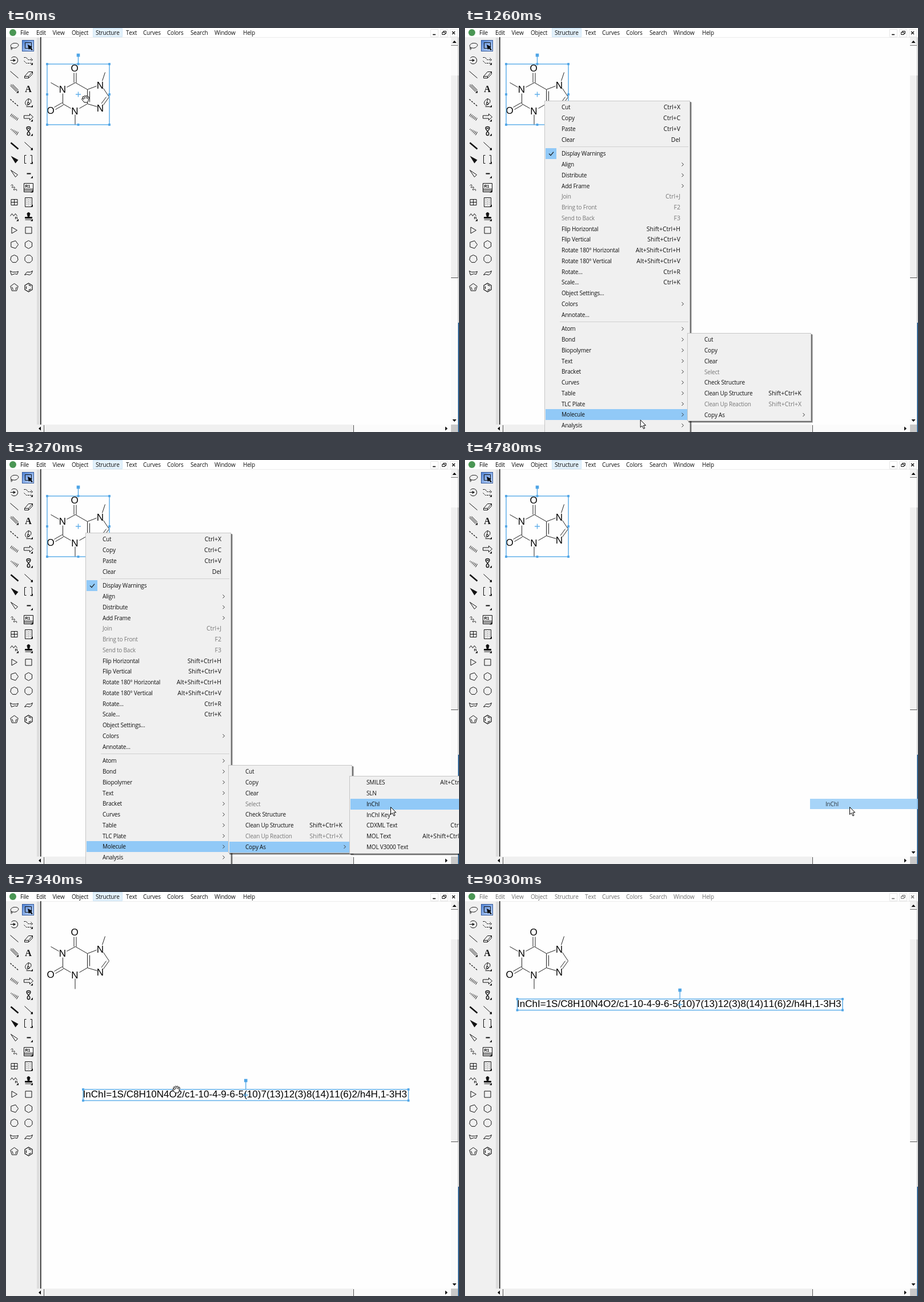
Recreate the animation shown at these times as an HTML page with a canvas. Size 793 by 706 pixels, loop 9.08 s.

```html
<!DOCTYPE html>
<html>
<head>
<meta charset="utf-8">
<style>
html, body { margin: 0; width: 100%; height: 100%; overflow: hidden; background: #fefefe; }
canvas { display: block; }
</style>
</head>
<body>
<canvas id="stage" width="793" height="706"></canvas>
<script>
const g = document.getElementById('stage').getContext('2d');
const LOOP = 9080, ROW = 18.75, HOVER = '#91c9f7', BLUE = '#62b0ea';
const UI = '"Open Sans", "Noto Sans", sans-serif', ARIAL = '"Liberation Sans", Arial, sans-serif';
const INCHI = 'InChI=1S/C8H10N4O2/c1-10-4-9-6-5(10)7(13)12(3)8(14)11(6)2/h4H,1-3H3';
g.fontKerning = 'none';

const clamp = v => Math.max(0, Math.min(1, v));
const ease = v => (v = clamp(v), v * v * (3 - 2 * v));
const box = (x, y, w, h, c) => { g.fillStyle = c; g.fillRect(x, y, w, h); };

function text(s, x, y, font, color = '#111', align = 'left', gap = 0) {
  g.font = font; g.fillStyle = color; g.textAlign = align;
  g.letterSpacing = gap + 'px';
  g.fillText(s, x, y);
}
const label = (s, x, y, color) => text(s, x, y, '10px ' + UI, color, 'left', -0.2);

// Draws an SVG path at x, y; fill and stroke may each be empty.
function path(x, y, d, stroke = '#111', fill, width = 1, dash = []) {
  const p = new Path2D(d);
  g.save();
  g.translate(x, y);
  g.lineWidth = width;
  g.setLineDash(dash);
  if (fill) { g.fillStyle = fill; g.fill(p); }
  if (stroke) { g.strokeStyle = stroke; g.stroke(p); }
  g.restore();
}

function poly(n, r, turn = 0) {
  const pts = Array.from({ length: n }, (_, i) => {
    const a = (i + turn) / n * 2 * Math.PI - Math.PI / 2;
    return (r * Math.cos(a)).toFixed(2) + ' ' + (r * Math.sin(a)).toFixed(2);
  });
  return 'M' + pts.join('L') + 'Z';
}

// Short slanted strokes along a falling diagonal; half-length grows from a to b.
function hashes(a, b) {
  return Array.from({ length: 6 }, (_, i) => {
    const h = a + (b - a) * i / 5, x = -5.5 + 2.2 * i, y = -3.5 + 1.5 * i;
    return `M${x - h * .6} ${y + h}L${x + h * .6} ${y - h}`;
  }).join('');
}

// Each tool: path, then optional stroke, fill, width and dash.
const K = '#111';
const TOOLS = [
  [['M-4 3C-9 0-5-5 1-5S9-2 6 1 0 4-4 3C-7 2-7 5-4 4-3 5-5 7-6 6'], ['M-6-6H5V4H-6Z']],
  [['M-5-4A6.3 6.3 0 1 1-5 4M-7 0H1M-1.500-2 2 0-1.500 2ZM-1 0H1.500'],
    ['M-8-5H-4L-1-1H7M4-4 7-1 4 2M-8 1-4 5H6', K, '', 1, [3, 1]]],
  [['M-7-6 7 6'], ['M-7 3 0-5H7L0 3ZM-7 3V6H0L7-1V-5M0 3V6']],
  [['M-7-5 4 6M-6-7 6 5M-3-7 7 3'], ['']],
  [['M-7-6 7 6', K, '', 1.2, [3, 2]], ['M-3 5C-8 2-6-4 0-7L4-5C6 0 2 3-3 5M0-7-1 0M-4 7H4M-2 0H1V3H-2Z']],
  [[hashes(2.2, 2.2)], ['M-8-2.5H2V-5.5L8 0 2 5.5V2.5H-8Z']],
  [[hashes(.8, 2.8)], ['M0 0C-5-5-4-8 0-8S5-5 0 0C-3 3-3 7 0 7S3 3 0 0M-2-5H2', K, '', 1.4]],
  [['M-6-5 7 6', K, '', 2.6], ['M-7-6 6 6M4 6H6V4']],
  [['M-6-6 7 1 2 7Z', '', K], ['M-4-7H-7V7H-4M3-7H6V7H3']],
  [['M-6-6 6 2 2 6Z'], ['M-3 0H4', K, '', 2]],
  [['M-6-4C-4-7-1-5-3-3S-4 0-2-1 2-2 0 1-1 4 1 3 5 2 4 5'], ['M-8-8H8V7H-8ZM-8 2H8M-8 4.5H8']],
  [['M-5.500-5H5.500V5H-5.500ZM0-5V5M-5.500 0H5.500'], ['M-6-8H6V8H-6Z']],
  [['M-7-1-4-5-1-1 2-5 5-1'], ['M-2-3A2.500 2.500 0 1 1 2-3L1 1H6V3H-6V1H-1ZM-6 5.500H6', K, K]],
  [['M-4.500-5.500 5 0-4.500 5.500Z'], ['M-5.500-5.500H5.500V5.500H-5.500Z']],
  [[poly(5, 7, .25)], [poly(6, 7)]],
  [[poly(7, 6.8)], [poly(8, 7, .5)]],
  [['M-7-4-3-2 3-2 7-3 5 2 1 1-5 3Z'], ['M7-4 3-2-3-2-7 3-3 2 2 3 5 1Z']],
  [[poly(5, 7) + 'M-4-1-2 4M4-1 2 4'], [poly(6, 7.5) + 'M-4-2V2.5M0-5 4-2.5M0 5 4 2.5', K, '', 1.2]]
];
const POPOUT = [[3, 12], [1, 4, 5, 6, 7, 8, 9, 10, 11, 12]];

function toolbar() {
  box(0, 16, 54, 690, '#f0f0f0');
  box(54, 16, 7, 690, '#dedede');
  const fade = g.createLinearGradient(29, 21, 48, 41);
  fade.addColorStop(0, '#4c7fd0');
  fade.addColorStop(1, '#c5dcff');
  box(28, 21, 21, 20, '#33599b');
  box(29, 22, 19, 18, fade);
  TOOLS.forEach((pair, i) => pair.forEach((tool, j) => {
    const x = 14 + 25 * j, y = Math.round(31 + 24.8 * i) + .5;
    path(x + .5, y, ...tool);
    if (POPOUT[j].includes(i)) path(x + 8, y + 8, 'M0-4V0H-4Z', '', K);
  }));
  path(39, 31, 'M-1-2 7 2 4 3 8 7 6 8 3 5 1 7Z', '', '#000');
  text('A', 39, 112, 'bold 16px "Liberation Serif", serif', K, 'center');
  text('R1', 38, 279, 'bold 7px ' + ARIAL, K, 'center');
  text('n', 18, 334, 'bold 8px ' + ARIAL, K, 'center');
  path(39.5, 303.5, 'M-3-5V5M0-4V6M3-5V5', '#333', '', 1, [1, 2]);
}

const MENUBAR = { File: 25, Edit: 53, View: 81.5, Object: 115, Structure: 157, Text: 210,
  Curves: 240, Colors: 282, Search: 323, Window: 365, Help: 415 };

function frameWindow(active) {
  const ink = active ? '#111' : '#707070';
  box(0, 0, 793, 706, '#fefefe');
  toolbar();
  box(0, 0, 793, 16, '#fff');
  box(54, 16, 738, 1, '#ececec');
  path(12, 8, 'M6 0A6 6 0 1 1-6 0 6 6 0 1 1 6 0', '', '#4a9654');
  if (active) path(0, 0, 'M152.5.5H203.5V15.5H152.5Z', '#cfe6f7', '#e3f1fb');
  for (const name in MENUBAR) label(name, MENUBAR[name], 12, ink);
  for (const x of [743.5, 760.5, 777.5]) path(x, 2.5, 'M0 0H13V13H0Z', '#e6e6e6');
  path(749, 11.5, 'M-2 0H3', ink, '', 1.6);
  path(766.5, 8.5, 'M-3-1H2V3H-3ZM-1-1V-3H4V1H2', ink);
  path(783.5, 8.5, 'M-2.5-2.5 2.5 2.5M2.5-2.5-2.5 2.5', ink, '', 1.3);

  box(60, 16, 1.6, 677, '#222');
  // scroll bars
  box(779, 17, 13, 676, '#fbfbfb');
  box(779, 17, 13, 14, '#f0f0f0');
  box(779, 83, 13, 354, '#f0f0f0');
  box(779, 436, 12, 1, '#555');
  box(779, 30, 12, 1, '#777');
  box(54, 693, 725, 13, '#fbfbfb');
  box(54, 693, 13, 13, '#f0f0f0');
  box(67, 693, 541, 13, '#f0f0f0');
  box(66, 694, 1, 12, '#555');
  box(608, 694, 1, 12, '#555');
  box(779, 693, 13, 13, '#c9c9c9');
  path(785, 24, 'M-3.5 2H3.5L0-2Z', '', '#000');
  path(785, 686, 'M-3.5-2H3.5L0 2Z', '', '#000');
  path(59, 700, 'M2-3.5V3.5L-2 0Z', '', '#000');
  path(771, 700, 'M-2-3.5V3.5L2 0Z', '', '#000');
  box(791, 16, 1, 690, '#c4c4c4');
  box(791, 83, 1, 354, '#888');
  box(792, 17, 1, 498, '#e8e8e8');
  box(791.5, 515, 1.5, 191, '#12538f');
}

function molecule() {
  path(.5, .5, 'M121 95 106 103M99 114V132L113 140M128 140 142 132V107L121 95M142 107 158 101' +
    'M170 105 180 120 170 134M159 137 142 132M146 110V129M166.500 131.500 175 120' +
    'M118.500 95V78M122.500 95V78M98 130 84 138M100 134 86 142' +
    'M92 103 78 95M120.500 151V169M168 92 173 77', '#222');
  const atoms = [['O', 120, 70], ['N', 99, 107], ['O', 78, 144], ['N', 120.5, 144.5], ['N', 165, 99.5], ['N', 165, 139.5]];
  for (const [s, x, y] of atoms) text(s, x, y + 6, '17px ' + ARIAL, '#000', 'center');
}

function selection(x, y, w, h, sides) {
  const cx = x + w / 2, cy = y + h / 2, dot = (px, py, r) => box(px - r, py - r, 2 * r, 2 * r, '#4fa5e6');
  path(x, y, `M0 0H${w}V${h}H0Z`, BLUE, '', 1.5);
  path(cx, y, 'M0 0V-15', BLUE, '', 1.5);
  path(cx, cy, 'M-4.500 0H4.500M0-4.500V4.500', BLUE, '', 1.4);
  dot(cx, y - 15.5, 2.8);
  for (const px of [x, x + w]) for (const py of [y, y + h]) dot(px, py, 1.9);
  if (sides) { dot(cx, y, 1.9); dot(cx, y + h, 1.9); dot(x, cy, 1.9); dot(x + w, cy, 1.9); }
}

// Item marks: "-" rule, "~" disabled, "*" checked; after "|" a shortcut, or ">" for a submenu.
const MAIN = ['Cut|Ctrl+X', 'Copy|Ctrl+C', 'Paste|Ctrl+V', 'Clear|Del', '-', '*Display Warnings', 'Align|>',
  'Distribute|>', 'Add Frame|>', '~Join|Ctrl+J', '~Bring to Front|F2', '~Send to Back|F3',
  'Flip Horizontal|Shift+Ctrl+H', 'Flip Vertical|Shift+Ctrl+V', 'Rotate 180° Horizontal|Alt+Shift+Ctrl+H',
  'Rotate 180° Vertical|Alt+Shift+Ctrl+V', 'Rotate...|Ctrl+R', 'Scale...|Ctrl+K', 'Object Settings...',
  'Colors|>', 'Annotate...', '-', 'Atom|>', 'Bond|>', 'Biopolymer|>', 'Text|>', 'Bracket|>', 'Curves|>',
  'Table|>', 'TLC Plate|>', 'Molecule|>', 'Analysis|>'];
const SUB = ['Cut', 'Copy', 'Clear', '~Select', 'Check Structure', 'Clean Up Structure|Shift+Ctrl+K',
  '~Clean Up Reaction|Shift+Ctrl+X', 'Copy As|>'];
const FORMATS = ['SMILES|Alt+Ctrl+C', 'SLN', 'InChI', 'InChI Key', 'CDXML Text|Ctrl+D',
  'MOL Text|Alt+Shift+Ctrl+M', 'MOL V3000 Text'];

function menu(x, y, w, h, items, hover, alpha) {
  if (alpha <= 0) return;
  g.globalAlpha = clamp(alpha);
  box(x + 3, y + 3, w, h, 'rgba(0,0,0,.2)');
  box(x + 2, y + 2, w, h, 'rgba(0,0,0,.45)');
  box(x, y, w, h, '#c6c6c6');
  box(x + 1, y + 1, w - 2, h - 2, '#f0f0f0');
  let cy = y + 11.7;
  for (const item of items) {
    if (item === '-') {
      box(x + 27, Math.round(cy - 6.5), w - 30, 1, '#d0d0d0');
      cy += 6;
      continue;
    }
    const [name, key] = item.replace(/^[~*]/, '').split('|');
    const ink = item[0] === '~' ? '#777' : '#111', top = Math.round(cy - ROW / 2);
    if (Math.abs(hover - cy) <= ROW / 2) box(x + 2, top, w - 5, 19, HOVER);
    if (item[0] === '*') {
      box(x + 2, top, 19, 19, HOVER);
      path(x + 12, cy, 'M-4 0-1 3 4-3', '#111', '', 1.2);
    }
    label(name, x + 30, cy + 3.6, ink);
    if (key === '>') path(x + w - 13, cy, 'M-1.500-3 1.500 0-1.500 3', '#333');
    else if (key) text(key, x + w - 17, cy + 3.6, '10.5px ' + UI, ink, 'right');
    cy += ROW;
  }
  g.globalAlpha = 1;
}

// Pointer stops: time, x, y.
const STOPS = [[0, 139, 124], [90, 139, 127], [280, 139, 127], [650, 260, 599], [890, 252, 684], [1140, 252, 684],
  [1430, 397, 685], [1670, 397, 685], [1980, 502, 670], [2150, 640, 664], [2340, 640, 664], [2570, 673, 606],
  [5760, 673, 606], [6040, 287, 338], [6250, 288, 337], [6400, 292, 344], [7230, 298, 345],
  [7410, 298, 345], [7730, 255, 187], [7840, 255, 187], [8140, 763, 645]];

function pointer(t) {
  const i = STOPS.findIndex(s => s[0] > t);
  if (i < 0) return STOPS.at(-1).slice(1);
  const [t0, x0, y0] = STOPS[i - 1], [t1, x1, y1] = STOPS[i], k = ease((t - t0) / (t1 - t0));
  return [x0 + (x1 - x0) * k, y0 + (y1 - y0) * k];
}

function cursor(x, y, hand) {
  if (hand) path(x, y, 'M-2 6-6 1C-7-1-5-2-4 0L-3 1-5-3C-5-5-3-5-2-3-3-6 0-7 1-4 1-7 4-6 4-3 5-5 7-4 6-1L5 3 4 6Z' +
    'M-2-3-1 0M1-4 1.500-1M4-3 3.500 0', '#000', '#fff');
  else path(x + .5, y + .5, 'M0 0V13L3 10.300 5.500 15.500 7.500 14.500 5.300 9.500H9.300Z', '#000', '#fff');
}

function draw(t) {
  frameWindow(t < 9030);
  molecule();
  const [px, py] = pointer(t);
  if (t < 6400) selection(72, 63, 109, 106, true);
  else {
    const k = ease((t - 7410) / 320), x = 135 - 43.5 * k, y = 345 - 158 * k;
    text(INCHI, x - .5, y + 14, '17.05px ' + ARIAL, '#000');
    if (t < 7410 || t >= 7880) selection(x, y, 569.5, 19.5);
  }
  if (t < 4780) {
    menu(139, 127, 255, 640, MAIN, t < 890 ? py : 676, t < 90 ? 0 : (t - 50) / 160);
    menu(389, 533, 217, 154, SUB, t < 1670 ? 0 : 676, t < 1140 ? 0 : (t - 1100) / 160);
    menu(601, 552, 225, 136, FORMATS, t < 2100 ? 0 : py, (t - 1800) / 160);
  } else if (t < 5070) {
    g.globalAlpha = .8 * (1 - (t - 4780) / 290);
    box(604, 592, 189, 18, HOVER);
    label('InChI', 631, 604.6);
    g.globalAlpha = 1;
  }
  if (t < 8140) cursor(px, py, t < 90 || t >= 6400 && t < 7900);
}

function tick() {
  draw(performance.now() % LOOP);
  requestAnimationFrame(tick);
}
tick();
</script>
</body>
</html>
```
